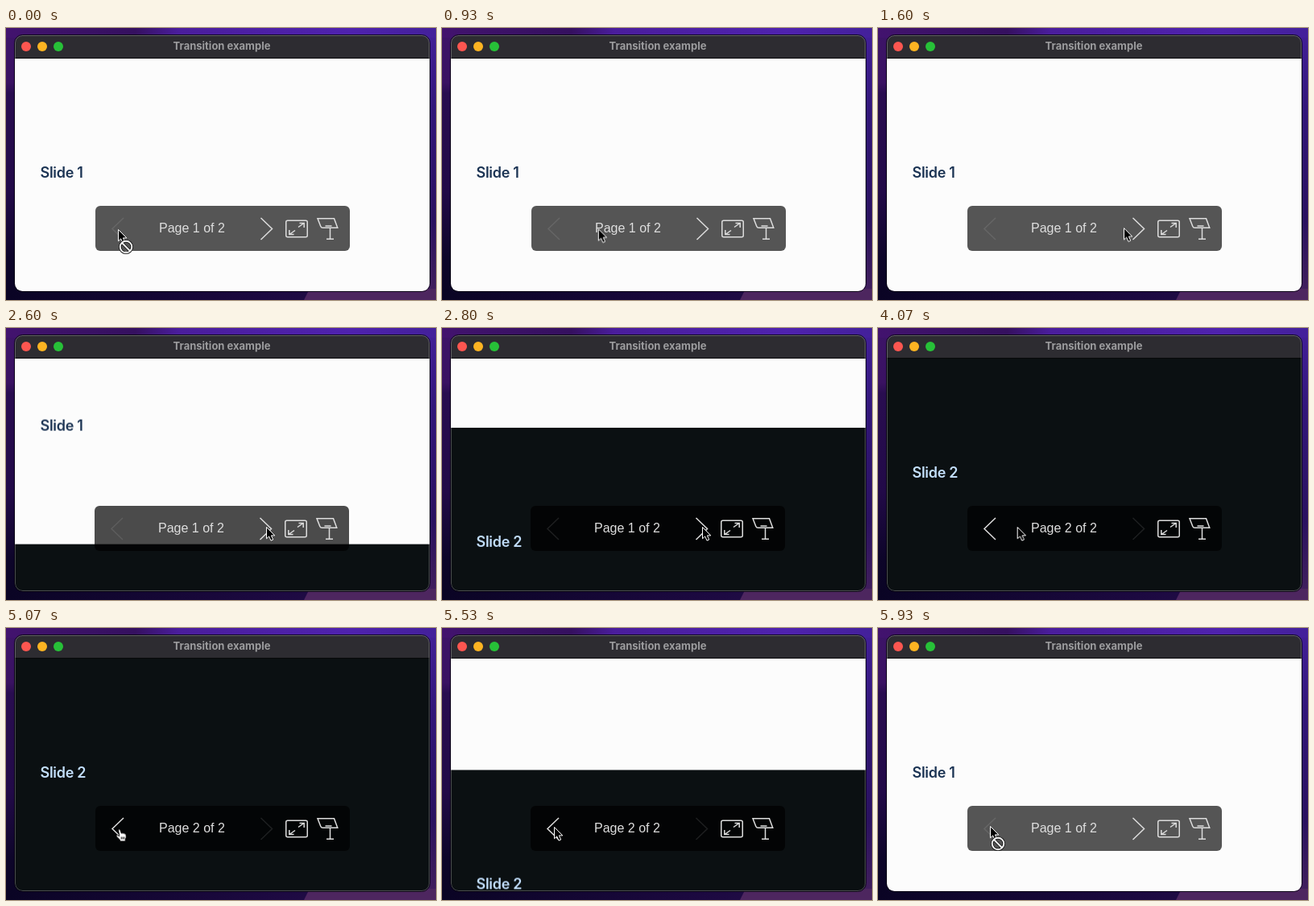
Recreate the animation shown at these times as an HTML page. Size 534 by 338 pixels, loop 5.99 s.

```html
<!DOCTYPE html>
<html lang="en">
<head>
<meta charset="utf-8">
<title>Transition example</title>
<style>
  html, body { margin: 0; width: 100%; height: 100%; overflow: hidden; background: #1a0838; }
  svg { display: block; width: 534px; height: 338px; }
  .title { font: 700 13px Inter, sans-serif; fill: #9c9c9e; text-anchor: middle; }
  .slide { font: 600 18px Inter, sans-serif; letter-spacing: -.3px; }
  .label { font: 16px "Liberation Sans", Arial, sans-serif; fill: #dedede; }
  .icon { fill: none; stroke: #dcdcdc; stroke-width: 1.5; }
  .off { opacity: .13; }

  .track, .bar, .panel, .one, .two, .cursor, .arrow, .hand, .ban {
    animation: 5990ms step-end infinite;
  }
  .track { animation-name: push; }
  .bar { animation-name: nudge; }
  .panel { animation-name: dim; }
  .one { animation-name: one; }
  .two { animation-name: two; }
  .cursor { animation-name: move; }
  .arrow { animation-name: arrow; }
  .hand { animation-name: hand; }
  .ban { animation-name: ban; }

  @keyframes push {
    0%, 50.451% { transform: translateY(0); }
    40.434% { transform: translateY(0); animation-timing-function: cubic-bezier(.37, 0, .63, 1); }
    50.451% { transform: translateY(-289px); }
    87.462% { transform: translateY(-289px); animation-timing-function: cubic-bezier(.37, 0, .63, 1); }
    97.479%, 100% { transform: translateY(0); }
  }
  @keyframes nudge {
    0%, 51.252%, 97.997%, 100% { transform: none; }
    40.434%, 87.462% { transform: translateX(-1px); }
  }
  @keyframes dim {
    0%, 51.252%, 97.997%, 100% { fill-opacity: .663; }
    40.434%, 87.462% { fill-opacity: .7; }
  }
  @keyframes one {
    0%, 97.997%, 100% { opacity: 1; }
    51.252% { opacity: 0; }
  }
  @keyframes two {
    0%, 97.997%, 100% { opacity: 0; }
    51.252% { opacity: 1; }
  }
  @keyframes move {
    0% { transform: translate(139px, 250px); }
    5.893% { transform: translate(139px, 250px); animation-timing-function: cubic-bezier(.37, 0, .63, 1); }
    32.07% { transform: translate(323px, 248px); }
    40.434% { transform: translate(323px, 247px); }
    57.429% { transform: translate(323px, 247px); animation-timing-function: cubic-bezier(.37, 0, .63, 1); }
    72.12% { transform: translate(139px, 247px); }
    97.997%, 100% { transform: translate(139px, 246px); }
  }
  @keyframes arrow {
    0%, 40.434%, 87.462%, 100% { opacity: 1; }
    27.546%, 69.482% { opacity: 0; }
  }
  @keyframes hand {
    0%, 40.434%, 87.462%, 100% { opacity: 0; }
    27.546%, 69.482% { opacity: 1; }
  }
  @keyframes ban {
    0%, 51.252%, 97.997%, 100% { opacity: 1; }
    10.851%, 59.933% { opacity: 0; }
  }
</style>
</head>
<body>
<svg viewBox="0 0 534 338">
  <defs>
    <linearGradient id="left" x2="0" y2="1">
      <stop offset="0" stop-color="#3d1468"/>
      <stop offset=".2" stop-color="#3a1262"/>
      <stop offset=".24" stop-color="#290d50"/>
      <stop offset=".6" stop-color="#220a48"/>
      <stop offset=".85" stop-color="#0d0529"/>
      <stop offset="1" stop-color="#0a0424"/>
    </linearGradient>
    <linearGradient id="top">
      <stop offset="0" stop-color="#42136e"/>
      <stop offset=".3" stop-color="#35105f"/>
      <stop offset=".4" stop-color="#4a1d9c"/>
      <stop offset=".8" stop-color="#4f22ae"/>
      <stop offset="1" stop-color="#43209a"/>
    </linearGradient>
    <linearGradient id="right" x2="0" y2="1">
      <stop offset="0" stop-color="#43209a"/>
      <stop offset=".3" stop-color="#32167a"/>
      <stop offset=".7" stop-color="#2a1160"/>
      <stop offset="1" stop-color="#43205c"/>
    </linearGradient>
    <linearGradient id="bottom">
      <stop offset="0" stop-color="#0a0424"/>
      <stop offset=".6" stop-color="#1c0940"/>
      <stop offset="1" stop-color="#27104e"/>
    </linearGradient>
    <clipPath id="frame"><rect x="11" y="9" width="515" height="318" rx="9.5"/></clipPath>
    <clipPath id="view"><rect x="11" y="38" width="515" height="289"/></clipPath>
    <path id="prev" class="icon" d="M146 236 132 249.5 146 263"/>
    <path id="next" class="icon" d="M316.500 236 330.500 249.500 316.500 263"/>
    <g id="stop">
      <circle r="7.300"/>
      <path d="M-5.200-5.200 5.200 5.200"/>
    </g>
  </defs>

  <rect width="534" height="338" fill="url(#left)"/>
  <rect x="520" width="14" height="338" fill="url(#right)"/>
  <rect width="534" height="12" fill="url(#top)"/>
  <rect y="324" width="534" height="14" fill="url(#bottom)"/>
  <path d="M370 338 377 324H534V338Z" fill="#4d265f"/>
  <rect x="10.500" y="8.500" width="516" height="319" rx="10" fill="none" stroke="#08040f" stroke-opacity=".85"/>

  <g clip-path="url(#frame)">
    <rect x="11" y="9" width="515" height="29" fill="#2d2c31"/>
    <rect x="11" y="37" width="515" height="1" fill="#08080a"/>
    <circle cx="25" cy="23" r="6" fill="#fc5650"/>
    <circle cx="45" cy="23" r="6" fill="#fdb422"/>
    <circle cx="65" cy="23" r="6" fill="#27c138"/>
    <text class="title" x="268" y="27">Transition example</text>
    <g clip-path="url(#view)">
      <g class="track">
        <rect x="11" y="38" width="515" height="289" fill="#fcfcfc"/>
        <text class="slide" x="42.500" y="186" fill="#1c3454">Slide 1</text>
        <rect x="11" y="327" width="515" height="289" fill="#0b1012"/>
        <text class="slide" x="42.500" y="475" fill="#c3dffc">Slide 2</text>
      </g>
    </g>
    <rect x="11.500" y="9.500" width="514" height="317" rx="9" fill="none" stroke="#fff" stroke-opacity=".25"/>
  </g>

  <g class="bar">
    <rect class="panel" x="111" y="221" width="316" height="56" rx="6"/>
    <g class="one">
      <use href="#prev" class="off"/>
      <use href="#next"/>
      <text class="label" x="190" y="254">Page 1 of 2</text>
    </g>
    <g class="two">
      <use href="#prev"/>
      <use href="#next" class="off"/>
      <text class="label" x="190" y="254">Page 2 of 2</text>
    </g>
    <g class="icon">
      <rect x="347.750" y="239.250" width="26.500" height="20.500" rx="2"/>
      <path d="M363 247.500 370 242.500M364.500 242.500H370.200V248M359 251.500 352 256.500M351.800 251V256.500H357.500"/>
      <path d="M387 236.750H407.500L411.750 248.250H393.500Q391.500 248.250 390.800 246.500ZM396.500 246H404.500M402.500 248.500V262M398 262.250H407"/>
    </g>
  </g>

  <g class="cursor">
    <g class="arrow">
      <path d="M.5 .5V14.800L3.700 11.900 6 17.200 8.700 16 6.400 10.900H10.800Z" stroke="#fff" stroke-width="1"/>
      <g class="ban" fill="none">
        <use href="#stop" x="10" y="22" stroke="#111" stroke-width="3.600"/>
        <use href="#stop" x="10" y="22" stroke="#f2f2f2" stroke-width="2"/>
      </g>
    </g>
    <g class="hand" transform="translate(-3 2.500)" stroke="#000" stroke-width=".9" stroke-linejoin="round">
      <path fill="#fff" d="M3.500 1.500Q4.800-.1 6 1.500L7.200 5.600Q8.200 4.500 9.200 5.700 10.300 4.800 11.200 6.200 12.600 5.600 13 7.200L13.300 10.500 12.200 13.200V15.500H5.800L5.400 13.700 1.300 9.700Q.2 7.900 2 7.600L4.900 9.200Z"/>
      <path fill="none" d="M7.200 10V13M9 10V13M10.800 10V13"/>
    </g>
  </g>
</svg>
</body>
</html>
```
